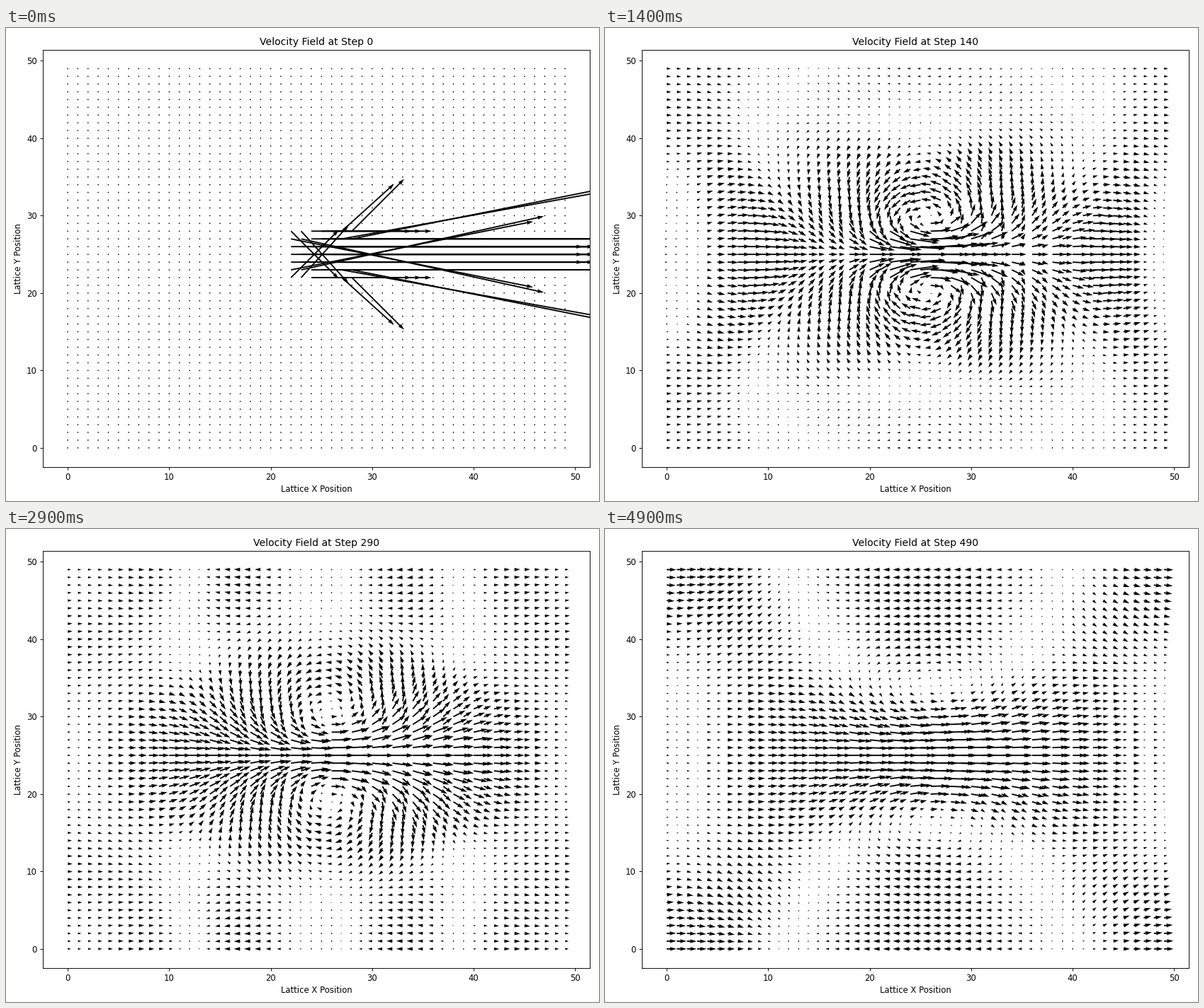
A matplotlib script that plays this animation: 837 px wide and 669 px high, repeating every 5 s.

```python
import numpy as np
import matplotlib.pyplot as plt
from matplotlib.animation import FuncAnimation

WIDTH, HEIGHT, DPI = 837, 669, 83.7
LEFT, RIGHT, TOP, BOTTOM = 52, 824.2, 30.6, 620.7  # axes edges in pixels
N = 50
FRAMES, STRIDE = 50, 10
TAU, JET_SPEED = 0.6, 0.05

# D2Q9 lattice
CX = np.array([0, 1, 0, -1, 0, 1, -1, -1, 1])
CY = np.array([0, 0, 1, 0, -1, 1, 1, -1, -1])
W = np.array([4 / 9] + [1 / 9] * 4 + [1 / 36] * 4)[:, None, None]


def equilibrium(rho, u, v):
    cu = CX[:, None, None] * u + CY[:, None, None] * v
    return W * rho * (1 + 3 * cu + 4.5 * cu**2 - 1.5 * (u**2 + v**2))


def stream(f):
    return np.array([np.roll(fi, (cy, cx), axis=(0, 1))
                     for fi, cx, cy in zip(f, CX, CY)])


def simulate():
    """Velocity snapshots of a small central jet on a periodic grid."""
    u, v = np.zeros((N, N)), np.zeros((N, N))
    core = slice(N // 2 - 2, N // 2 + 3)
    u[core, core] = JET_SPEED
    f = equilibrium(np.ones((N, N)), u, v)
    snapshots = []
    for step in range((FRAMES - 1) * STRIDE + 1):
        f = stream(f)
        rho = f.sum(axis=0)
        u = np.tensordot(CX, f, 1) / rho
        v = np.tensordot(CY, f, 1) / rho
        if step % STRIDE == 0:
            snapshots.append((u, v))
        f += (equilibrium(rho, u, v) - f) / TAU
    return snapshots


snapshots = simulate()

fig, ax = plt.subplots(figsize=((WIDTH + 1e-6) / DPI, (HEIGHT + 1e-6) / DPI), dpi=DPI)
fig.subplots_adjust(left=LEFT / WIDTH, right=RIGHT / WIDTH,
                    bottom=1 - BOTTOM / HEIGHT, top=1 - TOP / HEIGHT)
x, y = np.meshgrid(np.arange(N), np.arange(N))
field = ax.quiver(x, y, *snapshots[0])
title = ax.set_title("Velocity Field at Step 0")
ax.set_xlabel("Lattice X Position")
ax.set_ylabel("Lattice Y Position")


def update(frame):
    field.scale = None  # autoscale the arrows anew
    field.set_UVC(*snapshots[frame])
    title.set_text(f"Velocity Field at Step {frame * STRIDE}")
    return field, title


anim = FuncAnimation(fig, update, frames=FRAMES, interval=100, repeat=True,
                     repeat_delay=0, blit=False)
plt.show()
```
